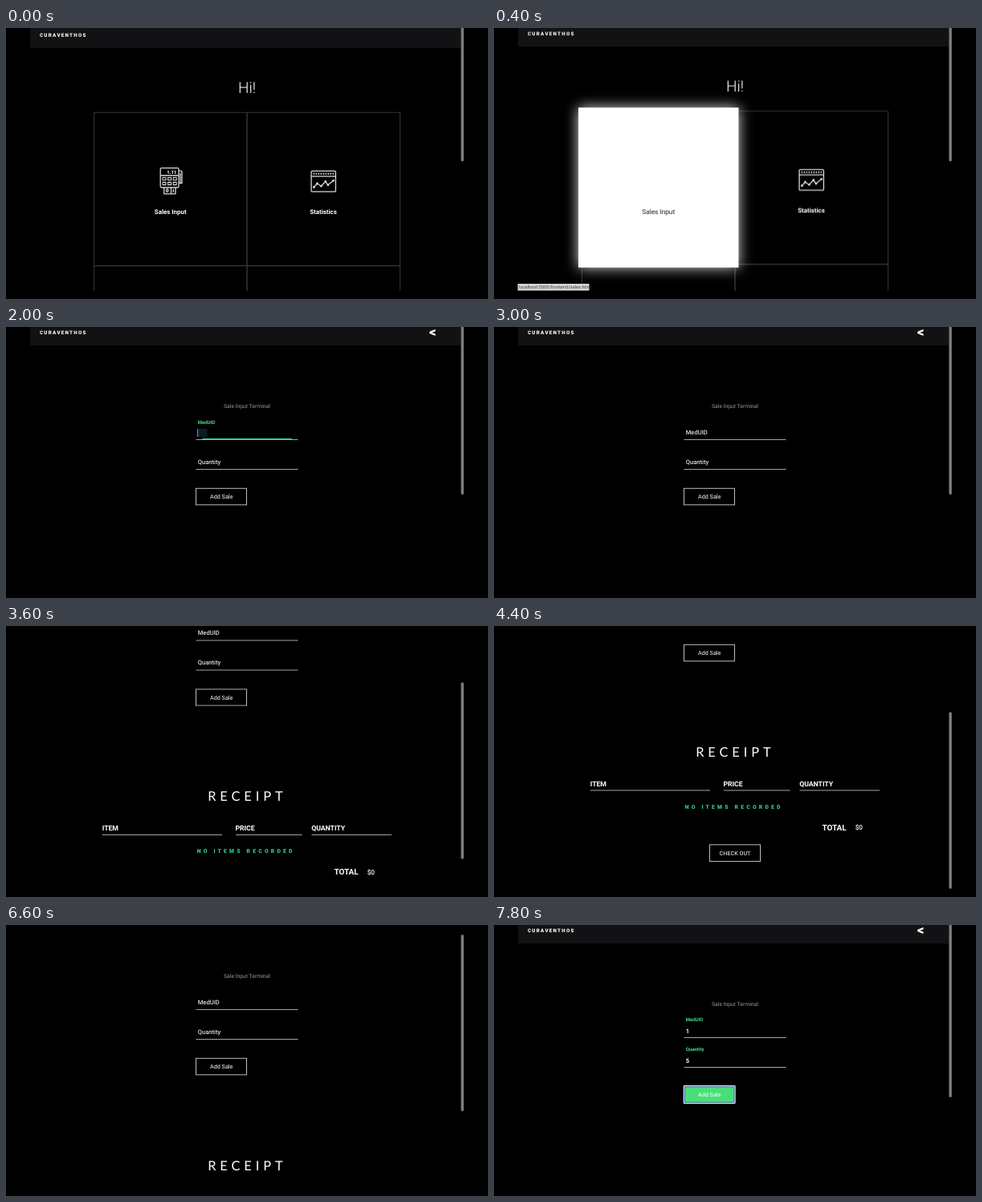
Recreate the animation shown at these times as an HTML page. Size 600x338 px, loop 8 s.

```html
<!DOCTYPE html>
<html lang="en">
<head>
<meta charset="utf-8">
<title>Sales terminal</title>
<style>
html, body { margin: 0; width: 100%; height: 100%; overflow: hidden; background: #000; }
svg { display: block; width: 100vw; height: 100vh; font-family: Roboto, Arial, sans-serif; fill: #fff; text-rendering: geometricPrecision; }
.mid { text-anchor: middle; }
.line { stroke: #a4a4a4; fill: none; }
.icon { fill: none; stroke: #d8d8d8; stroke-width: 1.3; stroke-linejoin: round; }
.thumb { fill: #7f7f7f; }
.brand { font-size: 6.2px; font-weight: 900; letter-spacing: 1.3px; }
.card { font-size: 7.9px; font-weight: 700; text-anchor: middle; }
.label { font-size: 7.6px; font-weight: 500; fill: #ddd; }
.value { font-size: 7.6px; font-weight: 700; }
.head { font-size: 8.7px; font-weight: 700; letter-spacing: -.05px; }
.btn { stroke: #bcbcbc; fill: #000; }
.btn-text { font-size: 7.2px; text-anchor: middle; }

/* every part runs on the same 8 s clock, held in 200 ms ticks */
.a { animation: 8s step-end infinite; }
.home { animation-name: home; }
.page { animation-name: page; }
.hover { animation-name: hover; transform-origin: 204.7px 199px; }
.glow { filter: drop-shadow(0 0 8px rgba(255,255,255,.85)); }
.status { animation-name: status; }
.sales { animation-name: sales; }
.view { animation-name: scroll; --s: 0; }
.content { transform: translateY(calc(var(--s) * -1px)); }
.bar { transform: translateY(calc(var(--s) * .667px)); }
.grow { animation-name: grow; }
.med { animation-name: med; }
.qty { animation-name: qty; }
.caret { animation-name: caret; }
.med-line { animation-name: medLine; transform-origin: 300px 0; }
.qty-line { animation-name: qtyLine; transform-origin: 300px 0; }
.one { animation-name: one; }
.five { animation-name: five; }
.add { animation-name: add; }
.ring { animation-name: ring; }
.out { animation-name: out; }

@keyframes home { 0% { opacity: 1 } 12.5%, 100% { opacity: 0 } }
@keyframes page { 0% { transform: translateY(1.8px) } 2.5%, 100% { transform: none } }
@keyframes hover {
  0% { opacity: 0; transform: none }
  2.5% { opacity: .6; transform: scale(1.03) }
  5%, 100% { opacity: 1; transform: scale(1.05) }
}
@keyframes status { 0% { opacity: 0 } 2.5%, 100% { opacity: 1 } }
@keyframes sales { 0% { opacity: 0 } 12.5% { opacity: .5 } 15% { opacity: .85 } 17.5%, 100% { opacity: 1 } }
@keyframes scroll {
  0% { --s: 0 } 40% { --s: 25 } 42.5% { --s: 72 } 45% { --s: 122.5 } 47.5% { --s: 152 }
  50% { --s: 170 } 52.5% { --s: 178 }
  77.5% { --s: 140 } 80% { --s: 85 } 82.5% { --s: 35 } 85% { --s: 8 } 87.5%, 100% { --s: 0 }
}
@keyframes grow { 0% { transform: none } 97.5%, 100% { transform: translateY(6px) } }
@keyframes med {
  0%, 30% { transform: none; font-size: 7.6px; fill: #ddd; font-weight: 500 }
  25% { transform: translateY(-12.5px); font-size: 6px; fill: #45dc93; font-weight: 700 }
  27.5%, 90%, 100% { transform: translateY(-13.5px); font-size: 6px; fill: #45dc93; font-weight: 700 }
}
@keyframes qty {
  0%, 35% { transform: none; font-size: 7.6px; fill: #ddd; font-weight: 500 }
  30%, 92.5%, 100% { transform: translateY(-13.8px); font-size: 6px; fill: #45dc93; font-weight: 700 }
}
@keyframes caret { 0%, 27.5% { opacity: 0 } 25% { opacity: 1 } 100% { opacity: 0 } }
@keyframes medLine {
  0%, 30%, 92.5%, 100% { transform: scaleX(0) }
  25% { transform: scaleX(.88) }
  27.5%, 90% { transform: none }
}
@keyframes qtyLine {
  0%, 35%, 97.5%, 100% { transform: scaleX(0) }
  30%, 92.5% { transform: scaleX(.88) }
  32.5%, 95% { transform: none }
}
@keyframes one { 0% { opacity: 0 } 90%, 100% { opacity: 1 } }
@keyframes five { 0% { opacity: 0 } 95%, 100% { opacity: 1 } }
@keyframes add { 0%, 37.5% { fill: #000 } 35%, 97.5%, 100% { fill: #4ade78 } }
@keyframes ring { 0% { opacity: 0 } 97.5%, 100% { opacity: 1 } }
@keyframes out { 0%, 72.5%, 100% { fill: #000 } 60% { fill: #4ade78 } }
</style>
</head>
<body>
<svg viewBox="0 0 600 338" preserveAspectRatio="none">
  <defs>
    <clipPath id="screen"><path d="M29.5 0H570V327.5H29.5Z"/></clipPath>
    <g id="top">
      <path fill="#121113" d="M30 -8H566.5V23.3H30Z"/>
      <text class="brand" x="42" y="8.8">CURAVENTHOS</text>
    </g>
  </defs>
  <path fill="#000" d="M0 0H600V338H0Z"/>

  <g clip-path="url(#screen)">
    <g class="a home">
      <g class="a page">
        <use href="#top"/>
        <text class="mid" x="300" y="79.4" font-size="19" font-weight="300">Hi!</text>
        <g fill="none" stroke="#343434">
          <path d="M109.5 340V103.5H490.5V340"/>
          <path stroke-width="1.5" d="M300 103.5V340M109.5 294.8H490.5"/>
        </g>
        <g transform="translate(0 -1.8)">
          <g class="icon">
            <rect x="192.2" y="174.6" width="22.8" height="24.4" rx="1.5"/>
            <path d="M192.2 184H215M215 178.2H217.5Q219 178.2 219 180V193.5H215M217 181V193"/>
            <path stroke-width="1.1" d="M195 186.5h4v3.2h-4zM201.6 186.5h4v3.2h-4zM208.2 186.5h4v3.2h-4zM195 192.4h4v3.2h-4zM201.6 192.4h4v3.2h-4zM208.2 192.4h4v3.2h-4z"/>
            <path d="M196.8 199V206.8H211V199M205.5 199V206.8M208.3 201V205"/>
            <ellipse cx="200.7" cy="202.8" rx="1.2" ry="1.8"/>
          </g>
          <text x="200.3" y="181.6" font-size="5.8" font-weight="900">1.11</text>
          <g class="icon">
            <rect x="380" y="178.4" width="30.4" height="25.8" rx="1.2"/>
            <path d="M380 185H410.4"/>
            <path stroke-width="2" stroke-dasharray="1.6 1.4" d="M382.5 181.7H408.5"/>
            <path d="M383.3 198.5L387.3 194L392.3 197.2L397.7 191.5L400.8 195.8L407.5 190.3"/>
            <path stroke-width="2.8" stroke-linecap="round" d="M383.3 198.5h.1M387.3 194h.1M392.3 197.2h.1M397.7 191.5h.1M400.8 195.8h.1M407.5 190.3h.1"/>
          </g>
        </g>
        <text class="card" x="204.7" y="230.2">Sales Input</text>
        <text class="card" x="395" y="230.2">Statistics</text>
      </g>
      <g class="a hover">
        <rect class="glow" x="109.7" y="104" width="190" height="190"/>
        <text class="card" x="204.7" y="230.6" fill="#222" style="font-weight:400">Sales Input</text>
      </g>
      <g class="a status">
        <path fill="#d4d4d4" d="M29.5 319H118.5V327.5H29.5Z"/>
        <text x="31" y="325.2" font-size="5.7" fill="#444">localhost:5500/frontend/sales.html</text>
      </g>
      <rect class="thumb" x="566.4" y="-9" width="3.4" height="175.5" rx="1.7"/>
    </g>

    <g class="a sales">
      <g class="a view">
        <g class="content">
          <use href="#top"/>
          <text class="mid" x="531" y="12.3" font-size="17" font-weight="900">&lt;</text>
          <text class="mid" x="300" y="100.9" font-size="6.8" fill="#999">Sale Input Terminal</text>

          <path class="line" d="M236.5 140.5H363.5M236.5 177.5H363.5"/>
          <path class="a med-line" fill="#3fd28c" d="M236.5 139H363.5V140.7H236.5Z"/>
          <path class="a qty-line" fill="#3fd28c" d="M236.5 176H363.5V177.7H236.5Z"/>
          <g class="a caret">
            <path fill="#0a1b24" d="M239 127H250.5V137H239Z"/>
            <path fill="#9a9a9a" d="M238.2 127H239.2V137H238.2Z"/>
          </g>
          <text class="a label med" x="238.7" y="133.7">MedUID</text>
          <text class="a label qty" x="238.7" y="170.6">Quantity</text>
          <text class="a value one" x="238.7" y="135">1</text>
          <text class="a value five" x="238.7" y="172.3">5</text>

          <rect class="a btn add" x="236.5" y="201.3" width="63" height="20.5"/>
          <g class="a ring" fill="none">
            <rect x="236.3" y="200.7" width="63.8" height="21.6" rx=".8" stroke="#dbe6ff" stroke-width="1.2"/>
            <rect x="237.4" y="201.8" width="61.6" height="19.4" stroke="#356b9c" stroke-width=".9"/>
          </g>
          <text class="btn-text" x="268.2" y="214.2">Add Sale</text>

          <g transform="translate(0 178)">
            <text x="251.2" y="162.9" font-size="16.4" letter-spacing="4.9" font-family="Lato, sans-serif">RECEIPT</text>
            <text class="head" x="119.8" y="199.5">ITEM</text>
            <text class="head" x="285.5" y="199.5">PRICE</text>
            <text class="head" x="380.3" y="199.5">QUANTITY</text>
            <path class="line" d="M120 205H269M286 205H368.5M380.5 205H480"/>
            <text x="237.7" y="227.6" font-size="6.8" font-weight="900" letter-spacing="3.2" fill="#35cf98">NO ITEMS RECORDED</text>
            <text x="408.6" y="254.6" font-size="10" font-weight="700" letter-spacing="-.05">TOTAL</text>
            <text x="449.7" y="254.4" font-size="8.2" font-weight="500">$0</text>
            <rect class="a btn out" x="268.5" y="272.8" width="63" height="20.7"/>
            <text class="btn-text" x="300" y="285.9">CHECK OUT</text>
          </g>
        </g>
        <g class="bar"><g class="a grow">
          <rect class="thumb" x="566.4" y="-11.5" width="3.4" height="220.5" rx="1.7"/>
        </g></g>
      </g>
    </g>
  </g>
</svg>
</body>
</html>
```
